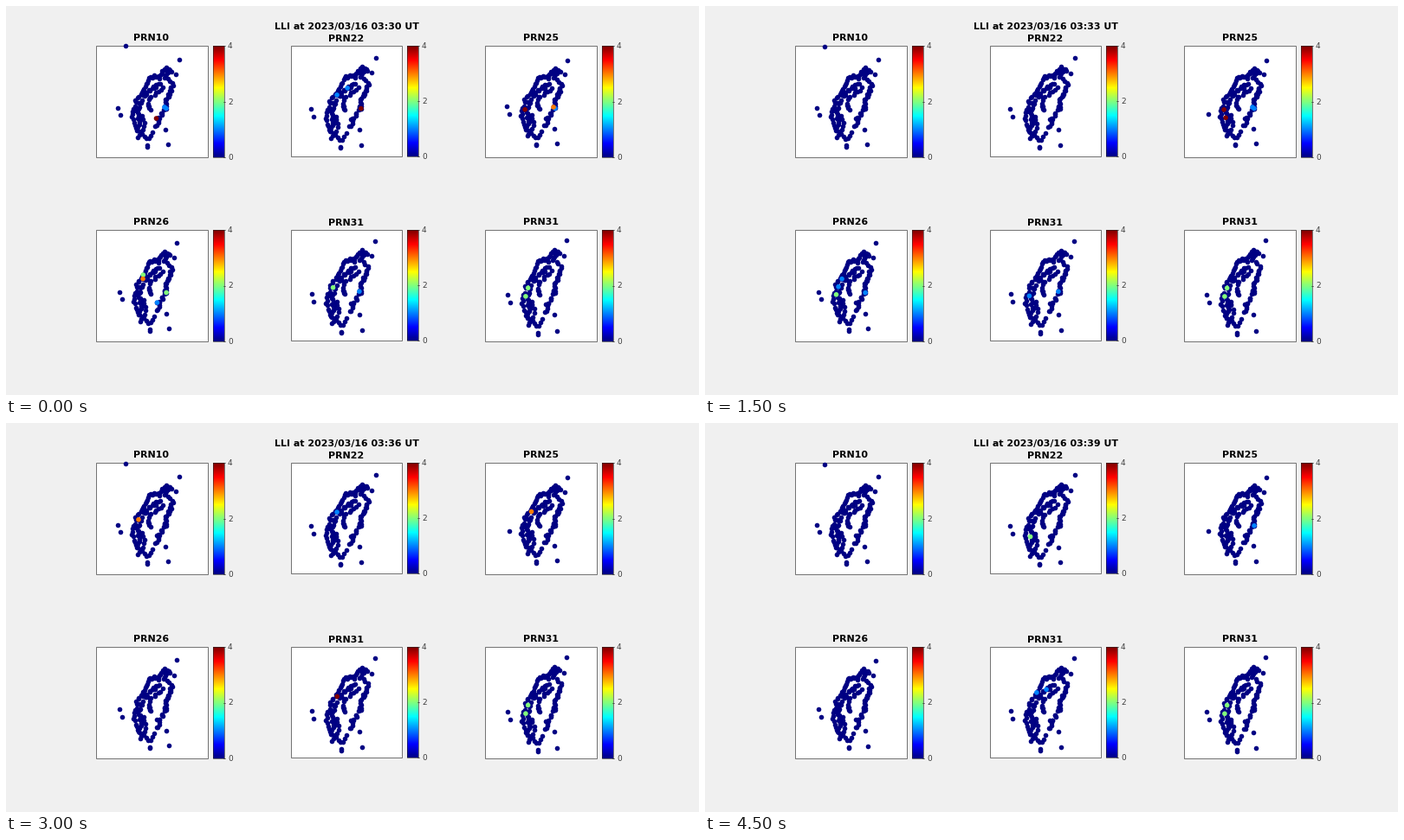
A matplotlib script that plays this animation: 800 by 450 pixels, repeating every 5000 ms.

```python
import numpy as np
import matplotlib.pyplot as plt
from matplotlib.animation import FuncAnimation
from matplotlib.patches import Rectangle

W, H, DPI = 800, 450, 100
FRAMES, STEP = 10, 500
PX = 72 / DPI

u = np.arange(1, 257) / 256
JET = np.stack([np.clip(1.5 - abs(4 * u - c), 0, 1) for c in (3, 2, 1)], axis=1)


def colour(value):
    return JET[min(255, value * 64)]


# All dots are placed in pixels of the first map.
ISLET = (128.5, 117.5)
OUTLYING = [(199.5, 61.5), (196, 78.5), (131.5, 126), (183.5, 142.5),
            (186.5, 160), (163, 161), (163, 162.5)]

# Receivers that lose lock, lettered from north to south.
STATIONS = {
    "a": (168.5, 83), "b": (169, 95), "c": (158, 98), "d": (157.5, 102.5),
    "e": (153, 111.5), "f": (183, 117), "g": (185, 118.5), "h": (166.5, 119.5),
    "i": (150, 120.5), "j": (152, 130), "k": (173.5, 130), "l": (152, 144),
}

# Chains of receivers: way points, dot count, spread.
CHAINS = [
    ([(177, 84), (179, 77), (185.5, 71), (191, 76)], 10, .8),
    ([(182, 83), (187, 78), (184, 74)], 6, 1),
    ([(187, 84), (193, 90), (189, 98)], 6, .8),
    ([(190, 97), (186, 106), (184, 117), (178, 128), (172, 140)], 23, 1.6),
    ([(175, 81), (167, 81), (162, 91), (157, 100), (149, 109)], 17, 1.2),
    ([(177, 88), (170, 94), (164, 100), (158, 107)], 13, 2.2),
    ([(181, 95), (171, 103)], 5, 1),
    ([(167, 104), (165, 112), (166, 119)], 7, 1.2),
    ([(150, 112), (145, 124), (148, 134), (152, 144)], 11, 1.2),
    ([(157, 112), (153, 122), (156, 132), (153, 141)], 12, 1.8),
    ([(158, 126), (160, 140), (154, 148)], 7, 1.2),
    ([(152, 151), (157, 146), (163, 155), (169, 146)], 9, .6),
]


def chain(rng, way, count, spread):
    way = np.array(way)
    t = np.linspace(0, len(way) - 1, count)
    line = np.stack([np.interp(t, range(len(way)), axis) for axis in way.T], axis=1)
    return line + rng.uniform(-spread, spread, line.shape)


rng = np.random.default_rng(16)
ISLAND = np.vstack([OUTLYING, list(STATIONS.values())] + [chain(rng, *c) for c in CHAINS])

# Each satellite pulls the north-east of the map this far, the south-west back.
NAMES = ["PRN10", "PRN22", "PRN25", "PRN26", "PRN31", "PRN31"]
TILTS = [(0, 0), (2, -1.6), (-.2, 1.2), (-2.5, -.3), (1.1, -2.9), (-1.5, -4)]

# Losses of lock for each minute: station letter and LLI value.
EVENTS = [
    ["f1 g1 k4", "f1", "", "", "", "e3", "e3", "e3 i1 l4", "e4 l4 h1", ""],
    ["d1 b1 g4", "g1", "g1", "", "", "", "d1", "b2 d1 f1", "i1 j1 l3 f4", "j2"],
    ["i4 g1 f3", "i3 f3", "j3 f3 g3", "i4 j4 f1 g1", "j1", "", "d3", "d3 j2",
     "d3 j1 f1 g4", "g1"],
    ["c2 d3 g2 k1", "d3 g2", "d4 e4 i3 l4 g4", "d1 e1 i2 g1", "i1", "", "",
     "a1 k2", "i4", ""],
    ["e2 f1", "e2", "i2", "i1 f1", "d1", "d4", "d4", "d4", "d4 c4", "c1 b1"],
    ["e2 i2"] * FRAMES,
]


def islet_seen(panel, k):
    return not (panel == 2 and k >= 3 or panel == 3 and k in (7, 8))


def project(points, panel, k):
    points = np.atleast_2d(points)
    x, y, *_ = frame(panel)
    across = (points[:, :1] - points[:, 1:] - 70) / 68
    origin = np.array([x - 104, y - 46 + .04 * k])
    return points + origin + across * TILTS[panel]


def frame(panel):
    row, col = divmod(panel, 3)
    size = 128 if col == 1 else 129
    return (104, 329, 553)[col], 46 + 213 * row, size, size


fig = plt.figure(figsize=(W / DPI, H / DPI), dpi=DPI, facecolor="#f0f0f0")
ax = fig.add_axes([0, 0, 1, 1])
ax.axis("off")


def label(x, y, text, size, **kw):
    return ax.text(x, y, text, fontsize=size * PX, family="DejaVu Sans", **kw)


def box(x, y, w, h, edge, fill, z, weight=1):
    ax.add_patch(Rectangle((x + .5, y + .5), w, h, facecolor=fill, edgecolor=edge,
                           lw=weight * PX, zorder=z, snap=False))


def draw_panel(panel):
    x, y, w, h = frame(panel)
    box(x, y, w, h, "#747474", "white", 1)
    base = y - 5 if w == 128 else y - 6
    label(x + w / 2 - .5, base, NAMES[panel], 11, weight="bold", ha="center")
    bar = x + w + 6
    ax.imshow(JET[:, None, :], extent=(bar, bar + 13, y, y + h), origin="upper",
              aspect="auto", interpolation="nearest", zorder=2)
    box(bar, y, 13, h, "#262626", "none", 3, .6)
    for value in (0, 2, 4):
        ty = y + h * (1 - value / 4)
        ax.plot([bar + 12, bar + 13.5], [ty, ty], color="#262626", lw=.6 * PX, zorder=3)
        label(bar + 17, ty + 3, str(value), 9, color="#404040")


def dots(z):
    return ax.scatter([0], [0], s=(5.6 * PX) ** 2, color=[JET[0]], lw=0, zorder=z)


for panel in range(6):
    draw_panel(panel)
ax.set_xlim(0, W)
ax.set_ylim(H, 0)

heading = label(393.5, 27, "", 11, weight="bold", ha="center")
calm, active = dots(4), dots(5)


def update(k):
    heading.set_text(f"LLI at 2023/03/16 03:{30 + k} UT")
    quiet, lit, tints = [(138, 46 + .2 * k)], [], []
    for panel in range(6):
        quiet.extend(project(ISLAND, panel, k))
        if islet_seen(panel, k):
            quiet.extend(project(ISLET, panel, k))
        for station, level in EVENTS[panel][k].split():
            lit.extend(project(STATIONS[station], panel, k))
            tints.append(colour(int(level)))
        if panel == 3 and k == 2:
            lit.extend(project(ISLET, panel, k))
            tints.append(colour(1))
    calm.set_offsets(quiet)
    active.set_offsets(lit)
    active.set_facecolor(tints)
    return heading, calm, active


anim = FuncAnimation(fig, update, frames=FRAMES, interval=STEP, repeat=True, repeat_delay=0)
plt.show()
```
